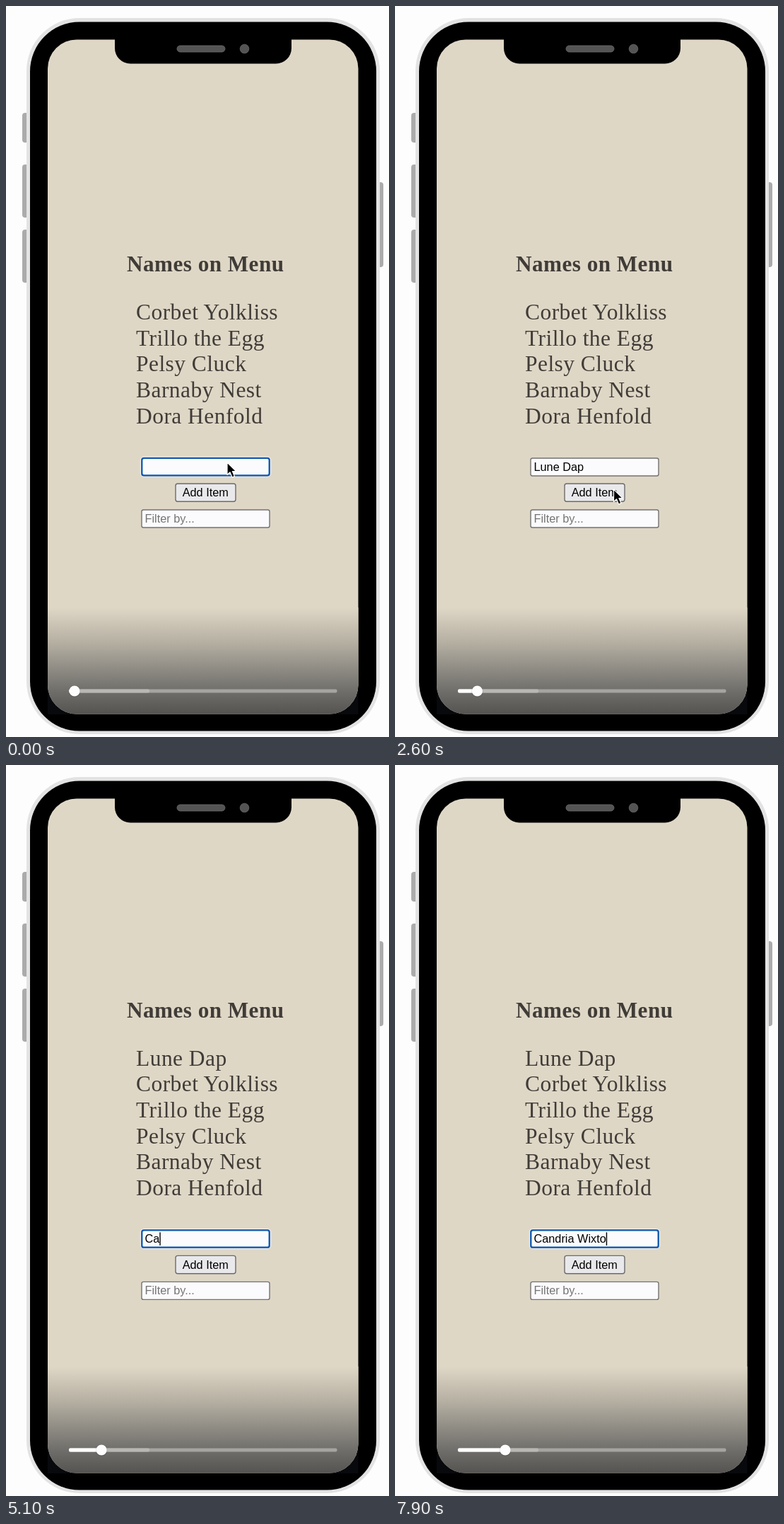
Animation of 542 by 1033 pixels, one loop 8000 ms. Source, as an HTML page:

```html
<!DOCTYPE html>
<html lang="en">
<head>
<meta charset="utf-8">
<title>Names on Menu</title>
<style>
html, body { margin: 0; width: 100%; height: 100%; overflow: hidden; background: #fdfdfd; }
svg { display: block; width: 542px; height: 1033px; }
text { white-space: pre; }
.serif { font-family: "Liberation Serif", "Times New Roman", serif; font-size: 31.5px; letter-spacing: .45px; fill: #403c37; }
.title { font-size: 31.2px; font-weight: bold; text-anchor: middle; }
.ui { font-family: "Liberation Sans", Arial, sans-serif; font-size: 16.3px; }
.box { fill: #fbfbfd; stroke: #737373; stroke-width: 1.4; }
</style>
</head>
<body>
<svg viewBox="0 0 542 1033">
  <defs>
    <linearGradient id="shade" x1="0" y1="0" x2="0" y2="1">
      <stop offset="0" stop-color="#dfd7c6"/>
      <stop offset=".33" stop-color="#b5afa2"/>
      <stop offset=".6" stop-color="#8b8881"/>
      <stop offset=".79" stop-color="#6e6d69"/>
      <stop offset="1" stop-color="#545351"/>
    </linearGradient>
    <clipPath id="screen"><rect x="59" y="47.5" width="439.5" height="953" rx="41"/></clipPath>
  </defs>

  <!-- phone body -->
  <g fill="#ababab">
    <rect x="23" y="151" width="12" height="42" rx="4"/>
    <rect x="23" y="224" width="12" height="75" rx="4"/>
    <rect x="23" y="316" width="12" height="75" rx="4"/>
    <rect x="522" y="249" width="12" height="120" rx="4"/>
  </g>
  <rect x="29" y="17" width="500" height="1012" rx="75" fill="#e3e3e3"/>
  <rect x="34" y="22.5" width="490" height="1002" rx="70"/>
  <rect x="59" y="960" width="439.5" height="41" fill="#08090c"/>

  <!-- screen -->
  <g clip-path="url(#screen)">
    <rect x="59" y="47" width="440" height="954" fill="#dfd7c6"/>
    <rect x="59" y="850" width="440" height="151" fill="url(#shade)"/>
  </g>
  <path d="M154 46V59.5A22 22 0 0 0 176 81.5H382A22 22 0 0 0 404 59.5V46Z"/>
  <rect x="242" y="56" width="68" height="9" rx="4.5" fill="#545454" stroke="#6a6a6a" stroke-width=".8"/>
  <circle cx="337.5" cy="60.5" r="6.3" fill="#545454" stroke="#6a6a6a" stroke-width=".8"/>

  <!-- list -->
  <g id="head" class="serif">
    <text class="title" x="282.3" y="375">Names on Menu</text>
    <text id="added" x="184" y="443"></text>
  </g>
  <g id="rows" class="serif"></g>

  <!-- form -->
  <g id="form" class="ui">
    <rect class="box" x="192" y="639" width="181" height="25" rx="2.5"/>
    <g id="ring" fill="none">
      <rect x="190.7" y="637.3" width="183.6" height="27.6" rx="4.5" stroke="#fff" stroke-width="1.4" opacity=".75"/>
      <rect x="192.3" y="638.9" width="180.4" height="24.4" rx="2.8" stroke="#0f59b0" stroke-width="2.3"/>
    </g>
    <text id="typed" x="196.5" y="656.5"></text>
    <rect id="caret" y="642" width="1.4" height="18.5"/>
    <rect x="240" y="675" width="85" height="25.3" rx="3" fill="#e9e9ec" stroke="#6b6b6b" stroke-width="1.4"/>
    <text x="282.3" y="693.3" text-anchor="middle">Add Item</text>
    <rect class="box" x="192" y="712" width="181" height="25" rx="2.5"/>
    <text x="196.5" y="729.7" fill="#757575">Filter by...</text>
  </g>

  <!-- player bar -->
  <rect x="89" y="965.5" width="379.5" height="5" rx="2" fill="#a5a4a1"/>
  <rect x="89" y="965.5" width="114" height="5" rx="2" fill="#b9b8b4"/>
  <rect id="played" x="89" y="965.5" height="5" rx="2" fill="#fff"/>
  <g id="knob">
    <circle cy="968.4" r="8.3" opacity=".12"/>
    <circle cy="968" r="7.6" fill="#fdfdfd"/>
  </g>

  <path id="arrow" d="M0 0V17.5L4 13.8L7 21L10.4 19.6L7.4 12.6H12.6Z" stroke="#fff" stroke-width="1.2" stroke-linejoin="round"/>
</svg>
<script>
const LOOP = 8000, TICK = 100, SHIFT = 18.4, PITCH = 36.7;
const ADD = 2800, BLUR = 2600, FOCUS = 3900;
const entries = [
  { text: "Lune Dap", start: 200, gap: 210 },
  { text: "Candria Wixton", start: 4700, gap: 260 }
];
const names = ["Corbet Yolkliss", "Trillo the Egg", "Pelsy Cluck", "Barnaby Nest", "Dora Henfold"];
// pointer stops: time, x, y
const stops = [[0, 313, 645], [2100, 313, 645], [2500, 309.5, 683], [3200, 309.5, 683], [3800, 301.5, 661], [LOOP, 301.5, 661]];

const el = {};
document.querySelectorAll("[id]").forEach(n => el[n.id] = n);
const show = (node, on) => node.setAttribute("visibility", on ? "visible" : "hidden");
const move = (node, x, y) => node.setAttribute("transform", `translate(${x} ${y})`);

el.added.textContent = entries[0].text;
names.forEach((name, i) => {
  const row = el.added.cloneNode();
  row.removeAttribute("id");
  row.setAttribute("y", 443 + i * PITCH);
  row.textContent = name;
  el.rows.append(row);
});

function pointer(t) {
  const i = stops.findIndex(s => s[0] > t);
  const [t0, x0, y0] = stops[i - 1], [t1, x1, y1] = stops[i];
  const p = (t - t0) / (t1 - t0), e = p * p * (3 - 2 * p);
  return [x0 + (x1 - x0) * e, y0 + (y1 - y0) * e];
}

function draw(t) {
  const added = t >= ADD, { text, start, gap } = entries[+added];
  const count = Math.min(text.length, Math.max(0, Math.floor((t - start) / gap) + 1));
  const lastKey = count ? start + (count - 1) * gap : FOCUS;
  const focused = t < BLUR || t >= FOCUS;
  const dy = added ? SHIFT : 0;

  move(el.head, 0, -dy);
  move(el.rows, 0, dy);
  move(el.form, 0, dy);
  show(el.added, added);
  show(el.ring, focused);

  el.typed.textContent = text.slice(0, count);
  el.caret.setAttribute("x", 196.5 + (count ? el.typed.getComputedTextLength() : 0));
  show(el.caret, focused && t >= lastKey && (t - lastKey) % 1000 < 500);

  move(el.arrow, ...pointer(t));
  show(el.arrow, t < entries[0].start || t >= 2000 && t < entries[1].start);

  const x = 97 + t * 0.00747;
  move(el.knob, x, 0);
  el.played.setAttribute("width", x - 89);
}

function frame(now) {
  draw(Math.floor(now % LOOP / TICK) * TICK);
  requestAnimationFrame(frame);
}
draw(0);
requestAnimationFrame(frame);
</script>
</body>
</html>
```
